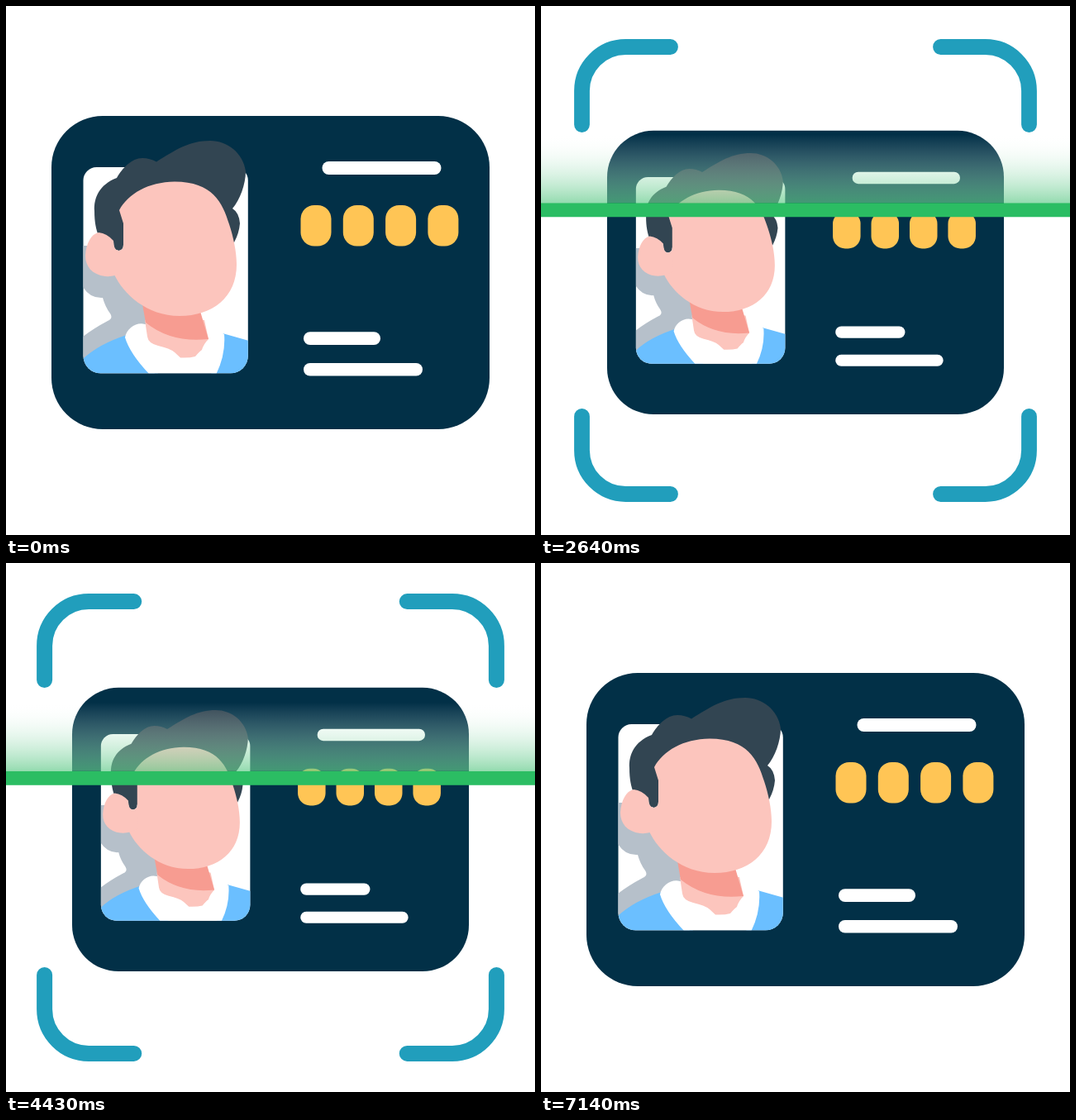
An HTML page with a canvas that plays this animation: 640 px wide and 640 px high, repeating every 7.28 s.

```html
<!DOCTYPE html>
<html lang="en">
<head>
<meta charset="utf-8">
<title>ID card scan</title>
<style>
html, body { margin: 0; width: 100%; height: 100%; overflow: hidden; background: #fff; }
canvas { display: block; width: 100vw; height: 100vh; }
</style>
</head>
<body>
<canvas id="stage" width="640" height="640"></canvas>
<script>
const ctx = document.getElementById('stage').getContext('2d');
const LOOP = 7280, STEP = 1000 / 14;

const NAVY = '#023047', TEAL = '#219ebc', AMBER = '#ffc555', GREEN = '#2bbd63';
const SKIN = '#fcc5bd', NECK = '#f79c91', HAIR = '#324552';
const BLUE = '#6bbfff', GRAY = '#b6c0ca';

const shapes = {
  shadow: 'M93 290V340Q102 354 117 353Q120 364 126 372Q130 378 123 381Q106 390 93 400V446H180L172 350L130 290Z',
  sweaterL: 'M93 427Q112 409 146 398L185 446H93Z',
  sweaterR: 'M262 396L294 405V446H248Z',
  shirt: 'M144 401C146 390 158 382 168 385H242L264 397Q266 422 254 446H174Q150 421 144 401Z',
  throat: 'M168 380L171 400Q172 408 184 411Q198 414 204 419L211 425.5Q222 426 229 424Q235 417 237 416Q239 409 245 403L240 380Z',
  neck: 'M164 355L169 383Q200 408 245 403L234 366Z',
  hair: 'M130 285Q130 296 136.500 296Q142 295 142 289L200 250L276 286Q282 275 283 263Q282 250 274 245' +
    'C283 235 290 215 290 200C287 178 268 163 247 163C222 163 205 174 182 188.500Q174 184 165 184' +
    'C152 184 141 196 134 208C113 216 106 232 107 248C107 262 109 270 112 278Z',
  face: 'M131 325C142 348 170 375 210 375C250 375 279 352 279 313C279 297 275 279 270 264' +
    'C262 238 250 212.500 204 212.500C172 213 148 227 137 247L142 263V289Q142 295 136.500 296Z',
  ear: 'M142 322Q131 328 120 327C104 325 96 315 96 302C97 287 103 276 112 274Q122 275 130 284Q130 296 136.500 296L142 300Z'
};
for (const k in shapes) shapes[k] = new Path2D(shapes[k]);

const corner = new Path2D('M-270.500 -176.500V-217.500A53 53 0 0 1 -217.500 -270.500H-163.500');

const clamp = x => Math.max(0, Math.min(1, x));
const part = (t, a, b) => clamp((t - a) / (b - a));
const mix = (a, b, k) => a + (b - a) * k;
const sine = u => (1 - Math.cos(Math.PI * u)) / 2;
const inOut = p => u => u < .5 ? (2 * u) ** p / 2 : 1 - (2 - 2 * u) ** p / 2;
const quart = inOut(4), cubic = inOut(3);

function fill(path, color) {
  ctx.fillStyle = color;
  ctx.fill(path);
}

function box(x, y, w, h, r, color) {
  const p = new Path2D();
  p.roundRect(x, y, w, h, r);
  if (color) fill(p, color);
  return p;
}

function cardScale(t) {
  if (t < 4430) return mix(1, .9057, quart(part(t, 560, 1400)));
  if (t < 5430) return mix(.9057, 1.0264, quart(part(t, 4430, 5430)));
  return mix(1.0264, 1, sine(part(t, 5430, 6300)));
}

function cornerScale(t) {
  if (t < 4140) return quart(part(t, 560, 1300));
  if (t < 4710) return mix(1, 1.021, sine(part(t, 4140, 4710)));
  return mix(1.021, 0, cubic(part(t, 4710, 5180)));
}

function drawCorners(s) {
  if (s <= 0) return;
  ctx.strokeStyle = TEAL;
  ctx.lineWidth = 18.8;
  ctx.lineCap = 'round';
  for (const sx of [-1, 1]) for (const sy of [-1, 1]) {
    ctx.save();
    ctx.translate(320, 320);
    ctx.scale(sx * s, sy * s);
    ctx.stroke(corner);
    ctx.restore();
  }
}

function drawPortrait() {
  const photo = box(93.5, 195, 199.3, 249.3, [16, 16, 21, 21], '#fff');
  ctx.save();
  ctx.clip(photo);
  fill(shapes.shadow, GRAY);
  fill(shapes.sweaterL, BLUE);
  fill(shapes.sweaterR, BLUE);
  fill(shapes.shirt, '#fff');
  fill(shapes.throat, SKIN);
  fill(shapes.neck, NECK);
  ctx.restore();
  fill(shapes.hair, HAIR);
  fill(shapes.face, SKIN);
  fill(shapes.ear, SKIN);
}

function drawCard(s) {
  ctx.save();
  ctx.translate(320, 322.3);
  ctx.scale(s, s);
  ctx.translate(-320, -322.3);
  box(55, 133, 530, 379, 62, NAVY);
  drawPortrait();
  box(382.5, 188, 144, 16, 8, '#fff');
  box(360, 394.3, 93, 15.7, 7.8, '#fff');
  box(360, 432, 144, 15.5, 7.7, '#fff');
  for (let i = 0; i < 4; i++) box(356.5 + i * 51.3, 241, 37, 49.5, 16.5, AMBER);
  ctx.restore();
}

// The beam sweeps down and back, fading at both ends and at the turn.
function drawBeam(t) {
  const away = Math.abs(t - 3548);
  const y = 627 - 541 * sine(clamp(away / 1430));
  const alpha = Math.min(part(t, 2310, 2600), 1 - part(t, 4460, 4860), clamp(away / 480));
  if (alpha <= 0) return;
  const top = y - 8.5, glow = ctx.createLinearGradient(0, top - 83, 0, top);
  glow.addColorStop(0, 'rgba(255,255,255,0)');
  glow.addColorStop(.5, 'rgba(176,228,197,.34)');
  glow.addColorStop(1, 'rgba(98,202,138,.68)');
  ctx.globalAlpha = alpha;
  ctx.fillStyle = glow;
  ctx.fillRect(0, top - 83, 640, 83);
  ctx.fillStyle = GREEN;
  ctx.fillRect(0, top, 640, 17);
  ctx.globalAlpha = 1;
}

function draw(now) {
  const t = Math.floor((now % LOOP + 5) / STEP) * STEP;
  ctx.fillStyle = '#fff';
  ctx.fillRect(0, 0, 640, 640);
  drawCorners(cornerScale(t));
  drawCard(cardScale(t));
  drawBeam(t);
}

const start = performance.now();
function tick() {
  draw(performance.now() - start);
  requestAnimationFrame(tick);
}
tick();
</script>
</body>
</html>
```
